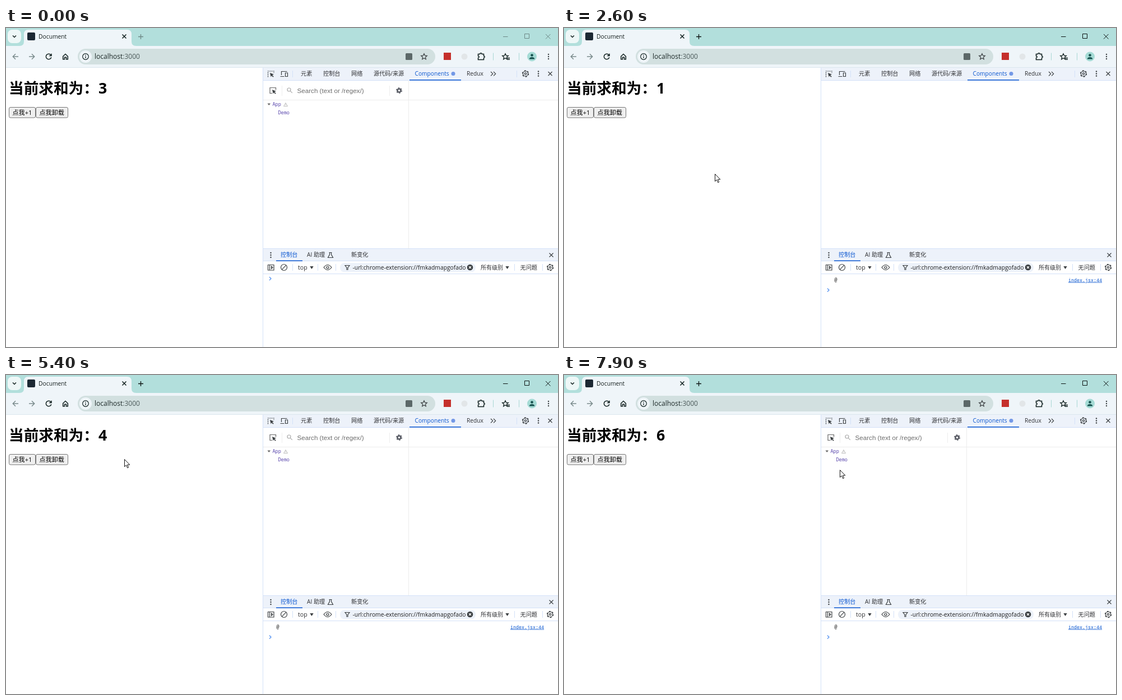
Write an HTML page that moves like this. It is 985 by 569 pixels and loops after 8 s.

```html
<!DOCTYPE html>
<html lang="zh-CN">
<head>
<meta charset="utf-8">
<title>Document</title>
<style>
html, body { margin: 0; width: 100%; height: 100%; overflow: hidden; background: #fff; }
svg { display: block; width: 100vw; height: 100vh; }
text { font: 10.2px "Open Sans", "Noto Sans CJK SC", "Noto Sans CJK", sans-serif; fill: #303134; }
.ln { fill: none; stroke: #3c4043; stroke-width: 1.2; }
.dk { fill: none; stroke: #10201f; stroke-width: 1.5; }
.dim { stroke: #7b8c8d; }
.fill { fill: #3c4043; stroke: none; }
.sep { fill: none; stroke: #d3e1f8; }
.pale { fill: none; stroke: #ececec; }
.blue { fill: #0b57d0; }
.bar { fill: #edf2fa; }
.win { fill: none; stroke: #6d8886; }
.active .win { stroke: #0c1413; }
.tree { font: 8.5px "Noto Sans Mono", "DejaVu Sans Mono", monospace; fill: #5a47ad; }
.log { font: 8.35px "Liberation Mono", monospace; fill: #111; }
.btn { fill: #efefef; stroke: #767676; }
.btnText { font-size: 11.1px; fill: #000; }
.sum { font-size: 26.67px; font-weight: 700; fill: #000; }
</style>
</head>
<body>
<svg id="stage" viewBox="0 0 985 569">
  <defs>
    <g id="gear" class="ln">
      <circle r="5.4" stroke-width="1.6" stroke-dasharray="2.8 2.85"/>
      <circle r="4.5"/>
      <circle r="1.7"/>
    </g>
    <g id="dots" class="fill"><circle cy="-4" r="1.2"/><circle r="1.2"/><circle cy="4" r="1.2"/></g>
    <path id="cross" d="M-3.5-3.5l7 7M3.5-3.5l-7 7"/>
    <path id="down" d="M-3.2-2.5h6.4l-3.2 5z" class="fill"/>
    <path id="star" d="M0-5.3L1.6-1.8 5.3-1.5 2.5 1 3.3 4.8 0 2.8-3.3 4.8-2.5 1-5.3-1.5-1.6-1.8Z"/>
    <path id="pick" d="M0 0l7 2.7-2.9 1.2 2.6 2.7-1.2 1.1-2.6-2.6L1.7 7.6Z" class="fill"/>
  </defs>

  <!-- Tab strip -->
  <rect width="985" height="34" fill="#b2dfdc"/>
  <rect x="3" y="3" width="24" height="24" rx="8" fill="#eef7f7"/>
  <path d="M12 13.5l3 3 3-3" class="dk"/>
  <path d="M24 32q8 0 8-8V11q0-8 8-8H216q8 0 8 8v13q0 8 8 8z" fill="#eff5f9"/>
  <rect x="38" y="8" width="14" height="14" rx="2" fill="#1c2833"/>
  <text x="58" y="19" style="font-size:10.3px;fill:#16201f">Document</text>
  <use href="#cross" x="211" y="15" class="dk"/>
  <path d="M236 15.5h9M240.5 11v9" class="win" stroke-width="1.3"/>
  <path d="M887 15.5h8.5M925.5 10.5h8v8h-8zM963 11l8.500 8.500M971.500 11l-8.500 8.500" class="win"/>

  <!-- Toolbar -->
  <rect y="32" width="985" height="38" fill="#eff5f9"/>
  <path d="M0 70.5H985" stroke="#dbe6ee"/>
  <path d="M22 51H12.5M17 46.3L12.3 51l4.700 4.700M41 51h9.500M46 46.3l4.700 4.700-4.700 4.700" class="dk dim"/>
  <circle id="hover" cx="76" cy="51" r="14" fill="#dfebed"/>
  <path d="M80.3 48.6A4.8 4.8 0 1 0 80.8 52.2M81 45.8v3.700h-3.800" class="dk"/>
  <path d="M101.7 50.5L106 46.5l4.300 4v5.300h-2.800v-3.600h-3v3.600h-2.800z" class="dk"/>
  <rect x="128" y="37" width="638" height="28" rx="14" fill="#d2e0e0"/>
  <circle cx="142" cy="51" r="11" fill="#eff5f9"/>
  <circle cx="142" cy="51" r="5.3" class="dk" style="stroke-width:1.2"/>
  <path d="M142 50.5v3.300M142 47.8v1.400" class="dk" style="stroke-width:1.3"/>
  <text x="158" y="55" style="font-size:12px;fill:#1d2928">localhost<tspan fill="#4b5959">:3000</tspan></text>
  <rect x="713" y="45" width="12" height="12" rx="1.5" fill="#5c6868"/>
  <use href="#star" x="746" y="51" class="ln"/>
  <rect x="781" y="44" width="13" height="13" fill="#c5302b"/>
  <circle cx="818" cy="51" r="5.5" fill="#e2e6e8"/>
  <path d="M842.5 46.5h3.200a1.700 1.700 0 0 1 3.400 0h3.400v3.400a1.700 1.700 0 0 1 0 3.400v3.200h-10v-3.200a1.700 1.700 0 0 0 0-3.400z" class="dk"/>
  <path d="M869.5 44.5v13M915.5 44.5v13" stroke="#a9d8d4"/>
  <use href="#star" x="891" y="51" class="dk" style="stroke-width:1.3"/>
  <path d="M894 53.5h5M895 56h4" class="dk" style="stroke-width:1.3"/>
  <circle cx="938.5" cy="51" r="8.5" fill="#a5dbd5"/>
  <circle cx="938.5" cy="48.5" r="2.3" fill="#17514e"/>
  <path d="M933.8 55.5q0-3.500 4.700-3.500t4.700 3.500z" fill="#17514e"/>
  <use href="#dots" x="968" y="51"/>

  <!-- Page -->
  <text class="sum" x="5" y="116.5">当前求和为：</text>
  <text class="sum" x="165" y="116.5" id="sum">3</text>
  <rect class="btn" x="5.5" y="141.5" width="47" height="18.5" rx="2.5"/>
  <rect class="btn" x="53.5" y="141.5" width="57" height="18.5" rx="2.5"/>
  <text class="btnText" x="11.5" y="155">点我+1</text>
  <text class="btnText" x="59.5" y="155">点我卸载</text>

  <!-- Inspector tabs -->
  <rect x="459" y="71" width="526" height="22" class="bar"/>
  <path d="M458.5 71V569M459 93.5H985M511.5 76v12M911.5 76v12" class="sep"/>
  <path d="M467.5 87.5v-10.500h10.500v3" class="ln" stroke-dasharray="2 1.3"/>
  <use href="#pick" x="471" y="80"/>
  <path d="M491.5 84v-6.500h10M489.5 86.5h7M498.5 80h4v6.500h-4z" class="ln"/>
  <text x="526" y="85">元素</text>
  <text x="566" y="85">控制台</text>
  <text x="616" y="85">网络</text>
  <text x="656" y="85" style="font-size:10.1px">源代码/来源</text>
  <text x="729.5" y="85" class="blue">Components</text>
  <circle cx="798" cy="81.5" r="3.5" fill="#7398e6"/>
  <rect x="720" y="92" width="92" height="1.5" class="blue"/>
  <text x="822" y="85">Redux</text>
  <path d="M865 78l3.700 3.700-3.700 3.700M870 78l3.700 3.700-3.700 3.700" class="ln"/>
  <use href="#gear" x="927" y="81.5"/>
  <use href="#dots" x="950" y="81.5"/>
  <use href="#cross" x="971" y="81.5" class="ln"/>

  <!-- Component tree -->
  <g id="panel">
    <path d="M459 128.5H985M718.5 94V393M492.5 103v18M684.5 103v18" class="pale"/>
    <path d="M475 116.5h-4v-10h10.500v4" class="ln" style="stroke:#666"/>
    <use href="#pick" x="475" y="110"/>
    <circle cx="505" cy="110" r="3" class="ln" style="stroke:#aaa"/>
    <path d="M507.3 112.3l3.500 3.500" class="ln" style="stroke:#aaa"/>
    <text x="519.5" y="115.5" style="font:11.65px 'Liberation Sans',sans-serif;fill:#6e6e6e">Search (text or /regex/)</text>
    <circle cx="701.5" cy="111.5" r="3" fill="none" stroke="#5a5d66" stroke-width="2.6"/>
    <circle cx="701.5" cy="111.5" r="4.8" fill="none" stroke="#5a5d66" stroke-width="1.4" stroke-dasharray="2.5 2.53"/>
    <path d="M466.5 134.5h5.500l-2.750 3.500z" fill="#666"/>
    <text x="475.5" y="139" class="tree">App</text>
    <path d="M499 133.5l3.500 6h-7zM499 135.5v2" fill="none" stroke="#bdbdbd"/>
    <text x="485.5" y="153.8" class="tree">Demo</text>
  </g>

  <!-- Console drawer -->
  <rect x="459" y="393" width="526" height="23" class="bar"/>
  <path d="M459 393.5H985M459 415.5H985M459 438.5H985M511.5 421v12M556.5 421v12M588.5 421v12M907.5 421v12M957.5 421v12" class="sep"/>
  <use href="#dots" x="472.5" y="405"/>
  <text x="490" y="408" class="blue">控制台</text>
  <rect x="482" y="414.5" width="47" height="1.5" class="blue"/>
  <text x="537" y="408">AI 助理</text>
  <path d="M576.5 400.5h5M577.5 400.5v3.500l-3 5.500h9l-3-5.500v-3.500" class="ln"/>
  <text x="616" y="408">新变化</text>
  <use href="#cross" x="973" y="405" class="ln"/>
  <path d="M467.5 422.5h10.500v9.500h-10.500zM470.5 422.5v9.500M473.5 425l2.500 2.200-2.500 2.300z" class="ln"/>
  <circle cx="496" cy="427" r="5.5" class="ln"/>
  <path d="M492.2 430.8l7.600-7.600" class="ln"/>
  <text x="521" y="431" style="font-size:10.6px">top</text>
  <use href="#down" x="545.5" y="427.5"/>
  <path d="M567 427q7-9 14 0-7 9-14 0z" class="ln"/>
  <circle cx="574" cy="427" r="2" class="ln"/>
  <rect x="596" y="419" width="242" height="16.5" rx="8" class="bar"/>
  <path d="M605 423.5h8l-3 4v3.500h-2v-3.500z" class="ln"/>
  <text x="618.5" y="431" style="font-size:10.3px;fill:#1f1f1f">-url:chrome-extension://fmkadmapgofado</text>
  <circle cx="828" cy="427" r="5.3" class="fill"/>
  <path d="M826 425l4 4M830 425l-4 4" stroke="#fff" stroke-width="1.2"/>
  <text x="847" y="431" style="font-size:10px">所有级别</text>
  <use href="#down" x="894.5" y="427.5"/>
  <text x="917.5" y="431">无问题</text>
  <use href="#gear" x="971" y="427"/>
  <g id="log">
    <text x="482.5" y="452" class="log">@</text>
    <text x="900" y="452.5" class="log" style="fill:#0b57d0;text-decoration:underline">index.jsx:44</text>
  </g>
  <path id="prompt" d="M470-3l3 3-3 3" fill="none" stroke="#4d8df0" stroke-width="1.2"/>

  <path id="cursor" d="M.5.5V13.5L3.5 10.8 5.7 15.7 7.7 14.8 5.5 10.1H9.8Z" fill="#fff" stroke="#111"/>
</svg>
<script>
const LOOP = 8000, STEP = 100;
const $ = id => document.getElementById(id);

// Each run: start time, then one pointer position per step; the last one holds.
const runs = [
  [300, 866,195, 547,285, 270,304, 111,252, 48,170, 29,110, 33,78, 40,60, 60,37, 70,44, 73,46],
  [1800, 76,50, 85,63, 143,110, 208,166, 218,186, 224,197],
  [2500, 232,209, 269,260, 283,282, 276,210, 229,153, 202,120, 190,117, 176,124, 159,131,
         204,176, 259,227, 318,315, 380,403, 434,468, 450,469, 470,465, 485,460, 490,457, 491,454],
  [4700, 431,438, 323,269, 240,176, 227,150, 211,150],
  [5600, 240,176, 323,269, 383,373, 431,438, 495,486, 492,465, 490,453],
  [7100, 488,453],
  [7400, 425,436, 316,318, 398,220, 473,188, 491,170, 492,169]
];
const counts = [[0, 3], [700, 4], [1500, 0], [2500, 1], [3400, 2], [4300, 3], [5300, 4], [6200, 5], [7200, 6]];

const latest = (list, t) => list.filter(e => e[0] <= t).pop();
const show = (id, on) => $(id).setAttribute("visibility", on ? "visible" : "hidden");

function pointer(t) {
  const run = latest(runs, t);
  if (!run) return null;
  const i = Math.min(Math.floor((t - run[0]) / STEP), (run.length - 3) / 2);
  return [run[1 + 2 * i], run[2 + 2 * i]];
}

function draw(now) {
  const t = Math.floor(now % LOOP / STEP) * STEP;
  const pos = pointer(t);
  const logged = t >= 1600;
  show("cursor", pos);
  if (pos) $("cursor").setAttribute("transform", `translate(${pos})`);
  $("sum").textContent = latest(counts, t)[1];
  $("stage").classList.toggle("active", t >= 1300);
  show("hover", t >= 1200 && t < 1900);
  show("panel", t < 1500 || t >= 2800);
  show("log", logged);
  $("prompt").setAttribute("transform", `translate(0 ${logged ? 467.5 : 447})`);
}

const start = performance.now();
function tick() {
  draw(performance.now() - start);
  requestAnimationFrame(tick);
}
tick();
</script>
</body>
</html>
```
